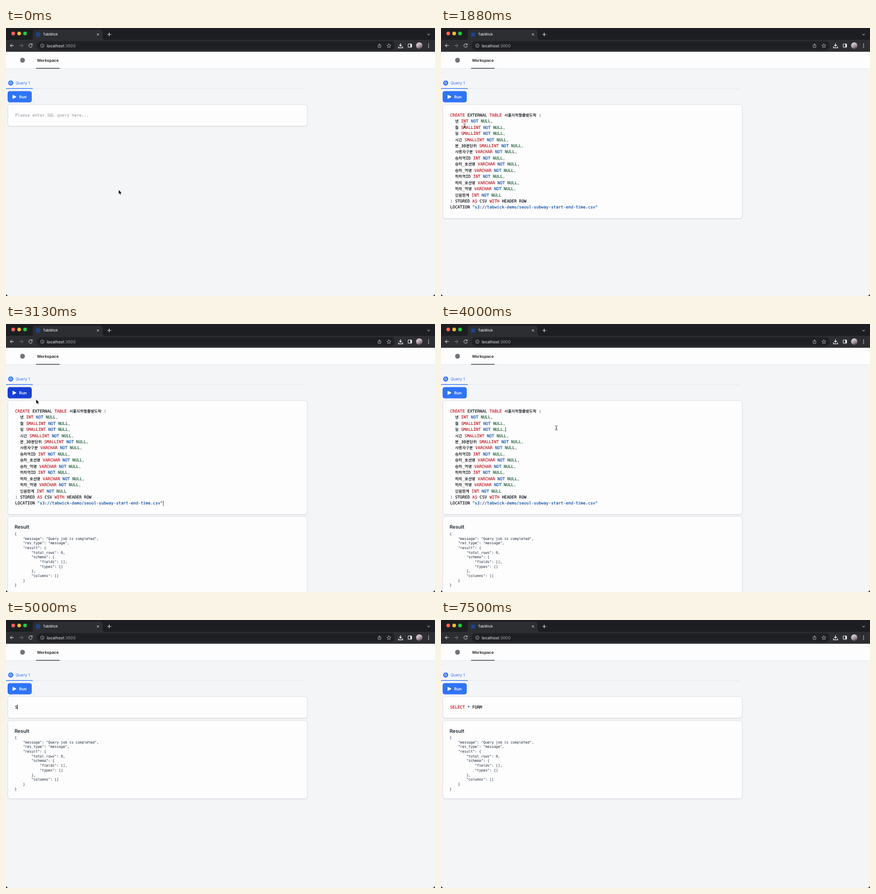
Animation of 800x499 px, one loop 8000 ms. Source, as an HTML page:

```html
<!DOCTYPE html>
<html lang="en">
<head>
<meta charset="utf-8">
<title>TabWick</title>
<style>
html, body { margin: 0; width: 100%; height: 100%; overflow: hidden; background: #1a1b1e; }
#stage {
  position: relative; width: 800px; height: 499px; overflow: hidden;
  background: #f4f5f7; border-radius: 0 0 5px 5px;
  text-rendering: geometricPrecision; font-family: Inter, sans-serif;
}
svg { position: absolute; left: 0; top: 0; }
#panels { position: absolute; left: 3px; top: 142.3px; width: 558.7px; }
#panels > div {
  box-sizing: border-box; background: #fdfdfd; border: 1px solid #e2e4e9;
  border-radius: 4.5px; box-shadow: 0 .6px 1.5px #0002;
}
pre {
  margin: 0; font: 7.64px/11.46px "DejaVu Sans Mono", monospace; color: #0c0f14;
  -webkit-text-stroke: .14px currentColor;
}
#editor { padding: 13.4px 13px 13.8px; }
#result { margin-top: 3.6px; padding: 14px 12px 12.7px; }
#result h2 { margin: 0 0 1.5px; font-size: 9.15px; font-weight: 600; line-height: 12px; color: #1f2937; }
#result pre { font-size: 6.52px; line-height: 8.69px; color: #4b5563; }
.row { display: inline-block; }
.hint { color: #a5a8ae; }
.key { color: #bd111c; }
.op, .str { color: #0548a0; }
.null { color: #10522a; }
.punct { color: #747b84; }
.ko { font: 7.22px/0 "Noto Sans CJK KR", "Noto Sans CJK", sans-serif; }
.sel .row { background: #aed2f8; }
.sel .row span { color: #16202e; }
#caret { position: absolute; width: .8px; height: 9.5px; background: #555; }
</style>
</head>
<body>
<div id="stage">
  <svg width="800" height="499" fill="none">
    <!-- browser bar -->
    <path fill="#1d1e22" d="M0 0H800V23H0Z"/>
    <path fill="#2d2e32" d="M0 22H800V44.4H0ZM46 22Q50 22 50 18V8Q50 3 55 3H175Q180 3 180 8V18Q180 22 184 22Z"/>
    <circle cx="13.5" cy="10.2" r="3.4" fill="#ff5f57"/>
    <circle cx="24.5" cy="10.2" r="3.4" fill="#febc2e"/>
    <circle cx="35.5" cy="10.2" r="3.4" fill="#28c840"/>
    <rect x="56" y="8.5" width="7.5" height="7.5" fill="#1c4686"/>
    <text x="69" y="14.3" font-size="6.8" font-weight="500" fill="#e4e6e9">TabWick</text>
    <rect x="57" y="24.5" width="668" height="16.5" rx="8.2" fill="#1f2024"/>
    <text x="76" y="35.6" font-size="7.6" fill="#eceef0">localhost<tspan fill="#9aa0a6">:3000</tspan></text>
    <g stroke="#dfe1e5">
      <path d="M169.7 10.2l3.6 3.6m0-3.6l-3.6 3.6M189.2 12h6.6m-3.3-3.3v6.6M785.8 11l2.3 2.2 2.3-2.2"/>
      <path d="M14.5 32.7H8m3.1-3.1L8 32.7l3.1 3.1"/>
      <path stroke="#7d8084" d="M25 32.7h6.5m-3.1-3.1l3.1 3.1-3.1 3.1"/>
      <path d="M48.4 30.6a3.2 3.2 0 1 0 .6 2.8M49 29v2.4h-2.4"/>
      <g stroke="#b9bcc1" stroke-width=".8">
        <circle cx="67.7" cy="32.9" r="3.2"/>
        <path d="M67.7 32.4v2.2m0-3.7v.8"/>
        <path d="M695.3 31.6h-1.3v4.6h5v-4.6h-1.3M696.5 34v-4.6m-1.6 1.5l1.6-1.6 1.6 1.6"/>
        <path d="M714 29.2l1.1 2.6 2.7.2-2.1 1.8.7 2.7-2.4-1.5-2.4 1.5.7-2.7-2.1-1.8 2.7-.2Z"/>
      </g>
      <path stroke="#f1f3f4" stroke-width="1.2" d="M735.7 28.5v5.4m-2.4-2.3l2.4 2.4 2.4-2.4M731.8 34.5v2.3h7.8v-2.3"/>
      <path stroke="#f1f3f4" d="M750 29.8h6.4v6H750Z"/>
      <path stroke="#f1f3f4" stroke-width="2.4" d="M755.2 29.8v6"/>
    </g>
    <linearGradient id="photo" x2=".6" y2="1">
      <stop stop-color="#e8e3e6"/><stop offset=".55" stop-color="#b9aab0"/><stop offset="1" stop-color="#66525a"/>
    </linearGradient>
    <circle cx="770.7" cy="32.7" r="6" fill="url(#photo)"/>
    <g fill="#dfe1e5">
      <circle cx="788" cy="29.8" r=".9"/><circle cx="788" cy="32.8" r=".9"/><circle cx="788" cy="35.8" r=".9"/>
    </g>
    <!-- page head -->
    <path fill="#fdfdfd" d="M0 44.4H800V75H0Z"/>
    <path fill="#e4e6ea" d="M0 75H800V75.7H0ZM0 112.2H557V112.9H0Z"/>
    <circle cx="30.8" cy="60" r="4.5" fill="#70747a"/>
    <text x="57.7" y="63.2" font-size="7.4" font-weight="600" fill="#17191d">Workspace</text>
    <path fill="#30343a" d="M56 74.6H100V75.8H56Z"/>
    <circle cx="8.8" cy="102.4" r="4.7" fill="#2f74f5"/>
    <path stroke="#fff" stroke-width=".8" d="M10 103.5l1.4 1.4M10.2 102a1.8 1.8 0 1 0-3.6 0 1.8 1.8 0 1 0 3.6 0"/>
    <text x="18" y="105.2" font-size="7.45" fill="#2f74f5">Query 1</text>
    <path fill="#2f74f5" d="M0 112H50V113.2H0Z"/>
    <rect id="run" x="3" y="117.6" width="45" height="20.8" rx="4.2"/>
    <path fill="#fff" stroke="#fff" stroke-linejoin="round" d="M12.8 125v6.4l6.2-3.2Z"/>
    <text x="24.6" y="131" font-size="7.5" font-weight="600" fill="#fff">Run</text>
  </svg>
  <div id="panels">
    <div id="editor"><pre id="code"></pre></div>
    <div id="result"><h2>Result</h2><pre id="json"></pre></div>
  </div>
  <div id="caret"></div>
  <svg width="800" height="499" fill="none">
    <path id="arrow" fill="#000" stroke="#fff" stroke-width=".7" d="M0 0V8.8L2 7 3.4 10 4.9 9.3 3.6 6.4H6.2Z"/>
    <path id="beam" stroke="#222" stroke-width=".75" d="M-2.4-4Q0-4 0-2.6Q0-4 2.4-4M0-2.6V2.8M-2.4 4Q0 4 0 2.6Q0 4 2.4 4M-1.2 1.3H1.2"/>
  </svg>
</div>
<script>
const $ = id => document.getElementById(id);
const LOOP = 8000, STEP = 125, CHAR = 4.6, HANGUL = 6.64, ROW = 11.46;

const columns = ['년 INT', '월 SMALLINT', '일 SMALLINT', '시간 SMALLINT', '분_30분단위 SMALLINT',
  '사용자구분 VARCHAR', '승차역ID INT', '승차_호선명 VARCHAR', '승차_역명 VARCHAR',
  '하차역ID INT', '하차_호선명 VARCHAR', '하차_역명 VARCHAR', '인원합계 INT'];
const createSql = 'CREATE EXTERNAL TABLE 서울지하철출발도착 (\n'
  + columns.map(c => `  ${c} NOT NULL`).join(',\n')
  + '\n) STORED AS CSV WITH HEADER ROW\nLOCATION "s3://tabwick-demo/seoul-subway-start-end-time.csv"';
const selectSql = 'SELECT * FORM';
const keyTimes = [5000, 5125, 5625, 5750, 6000, 6125, 6250, 6375, 6500, 6750, 6875, 7000, 7125];

$('json').textContent = JSON.stringify({
  message: 'Query job is completed', res_type: 'message',
  result: { total_rows: 0, schema: { fields: [], types: [] }, columns: [] }
}, null, 4);

// pointer path: time, x, y
const path = [[0, 210, 301], [125, 162, 202], [250, 162, 202], [375, 122, 164], [1250, 122, 164],
  [1875, 44, 182], [2000, 40, 160], [2125, 34, 132], [2875, 28, 129], [3000, 30, 130],
  [3125, 56, 140], [3875, 215, 193.5], [5000, 215, 193.5]];

// caret intervals: from, to, row, column (-1 means end of text)
const carets = [[500, 1000, 0, 0], [1250, 1500, 15, -1], [2000, 2500, 15, -1], [3000, 3500, 15, -1],
  [3875, 4500, 3, -1], [5000, 7500, 0, -1]];

const tokens = /"[^"]*"|[가-힣]+|\b(?:CREATE|TABLE|SMALLINT|INT|VARCHAR|AS|WITH|SELECT|NOT|NULL)\b|[(),*]/g;
const kind = s => s[0] === '"' ? 'str' : /[가-힣]/.test(s) ? 'ko' : /NOT|\*/.test(s) ? 'op'
  : s === 'NULL' ? 'null' : /[(),]/.test(s) ? 'punct' : 'key';
const paint = line => line.replace(tokens, s => `<span class="${kind(s)}">${s}</span>`);
const width = s => [...s].reduce((w, c) => w + (/[가-힣]/.test(c) ? HANGUL : CHAR), 0);

function textAt(t) {
  if (t < 1250) return '';
  return t < 5000 ? createSql : selectSql.slice(0, keyTimes.filter(k => k <= t).length);
}

function pointerAt(t) {
  const i = path.findIndex(p => p[0] > t);
  if (i < 0) return null;
  const [a, b] = [path[i - 1], path[i]];
  const u = (t - a[0]) / (b[0] - a[0]), e = u * u * (3 - 2 * u);
  return [a[1] + (b[1] - a[1]) * e, a[2] + (b[2] - a[2]) * e];
}

function show(el, on) { el.style.display = on ? '' : 'none'; }

function render(t) {
  const text = textAt(t), lines = text.split('\n');
  $('code').innerHTML = text
    ? lines.map((l, i) => `<span class="row">${paint(l)}${i < lines.length - 1 ? ' ' : ''}</span>`).join('\n')
    : '<span class="hint">Please enter SQL query here...</span>';
  $('code').className = t >= 4750 && t < 5000 ? 'sel' : '';
  show($('result'), t >= 3000);
  $('run').setAttribute('fill', t >= 2125 && t < 3250 ? '#1741d4' : '#2f74f5');

  const caret = carets.find(c => t >= c[0] && t < c[1]);
  show($('caret'), caret);
  if (caret) {
    const [, , row, col] = caret;
    $('caret').style.left = 16.7 + (col < 0 ? width(lines[row]) : 0) + 'px';
    $('caret').style.top = 157.3 + row * ROW + 'px';
  }

  const p = pointerAt(t), bottom = 171 + lines.length * ROW;
  const inEditor = p && p[1] > 142.3 && p[1] < bottom;
  show($('arrow'), p && !inEditor);
  show($('beam'), inEditor);
  if (p) for (const id of ['arrow', 'beam']) $(id).setAttribute('transform', `translate(${p})`);
}

const start = performance.now();
let last = -1;
function tick() {
  const step = Math.floor((performance.now() - start) % LOOP / STEP);
  if (step !== last) render((last = step) * STEP);
  requestAnimationFrame(tick);
}
tick();
</script>
</body>
</html>
```
